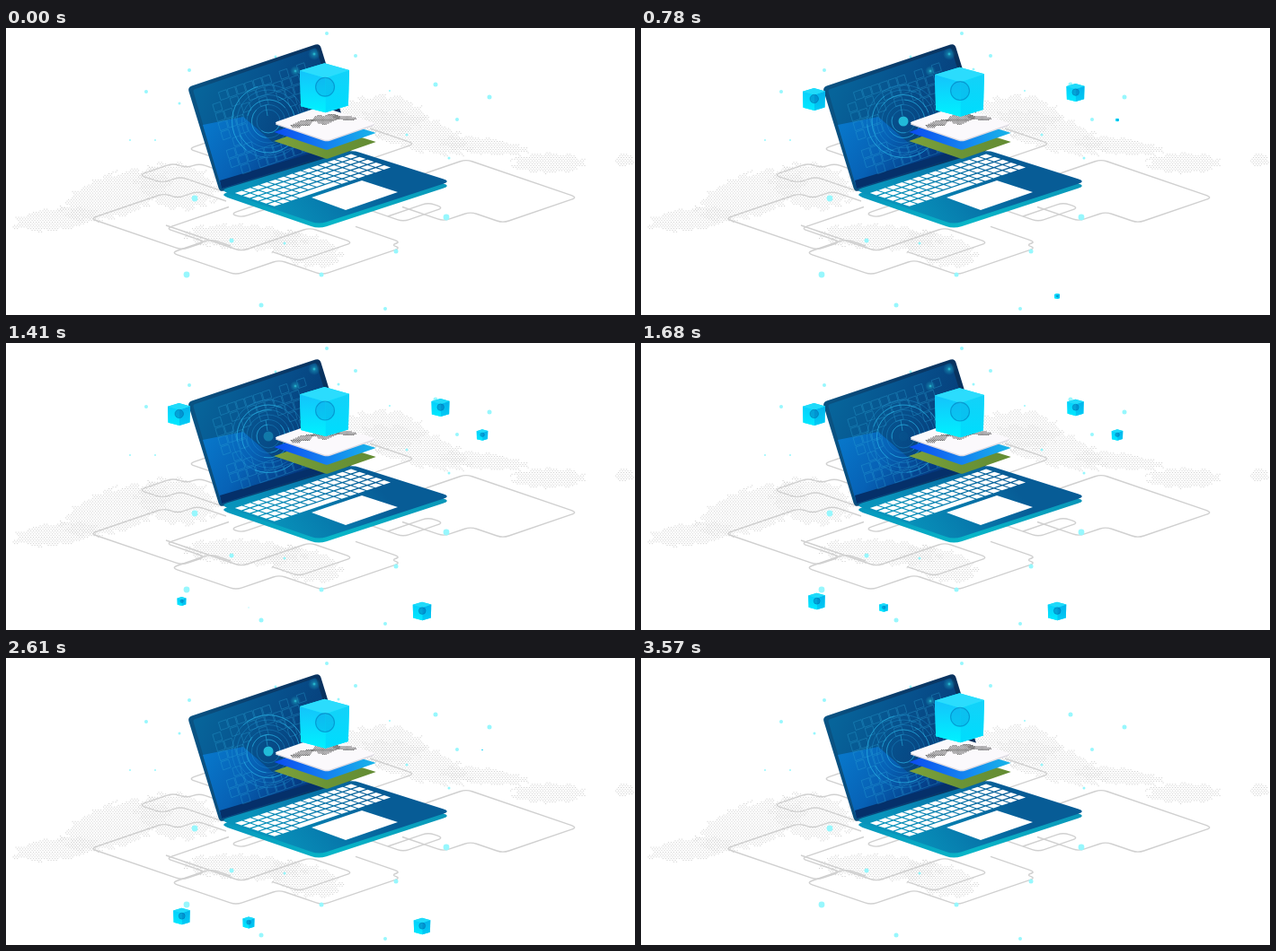
Write an HTML page with a canvas that moves like this. It is 700x320 px and loops after 3600 ms.

```html
<!DOCTYPE html>
<html lang="en">
<head>
<meta charset="utf-8">
<title>Laptop with floating cubes</title>
<style>
html, body { margin: 0; width: 100%; height: 100%; overflow: hidden; background: #fff; }
canvas { display: block; width: 700px; height: 320px; }
</style>
</head>
<body>
<canvas id="stage" width="700" height="320"></canvas>
<script>
const W = 700, H = 320, LOOP = 3600, TAU = 2 * Math.PI;
const SLOPE = .342; // rise of both isometric axes
const stage = document.getElementById('stage').getContext('2d');

function layer(draw) {
  const c = document.createElement('canvas');
  c.width = W;
  c.height = H;
  draw(c.getContext('2d'));
  return c;
}

function ramp(g, x0, y0, x1, y1, ...colors) {
  const f = g.createLinearGradient(x0, y0, x1, y1);
  colors.forEach((c, i) => f.addColorStop(i / (colors.length - 1), c));
  return f;
}

// Point on the way from a to b, at most `cut` away from a
function toward(a, b, cut) {
  const k = Math.min(.5, cut / (Math.hypot(b[0] - a[0], b[1] - a[1]) || 1));
  return [a[0] + (b[0] - a[0]) * k, a[1] + (b[1] - a[1]) * k];
}

function corner(g, prev, p, next, cut) {
  g.lineTo(...toward(p, prev, cut));
  g.quadraticCurveTo(...p, ...toward(p, next, cut));
}

function poly(g, p, fill, cut = 0) {
  const n = p.length;
  g.beginPath();
  p.forEach((a, i) => corner(g, p[(i + n - 1) % n], a, p[(i + 1) % n], cut));
  g.closePath();
  g.fillStyle = fill;
  g.fill();
}

function disc(g, x, y, r, fill) {
  g.beginPath();
  g.arc(x, y, r, 0, TAU);
  g.fillStyle = fill;
  g.fill();
}

// Steps alternate between the rising and the falling axis
function wire(g, x, y, ...steps) {
  const p = [[x, y]];
  steps.forEach((d, i) => {
    x += d;
    y += i % 2 ? d * SLOPE : -d * SLOPE;
    if (d) p.push([x, y]);
  });
  g.beginPath();
  g.moveTo(...p[0]);
  for (let i = 1; i < p.length - 1; i++) corner(g, p[i - 1], p[i], p[i + 1], 7);
  g.lineTo(...p[p.length - 1]);
  g.stroke();
}

// Staggered dots inside tilted blobs with ragged coasts
function land(g, blobs, dx, dy, size, rough) {
  for (const [cx, cy, rx, ry, tilt = 0] of blobs)
    for (let j = Math.floor((cy - 2 * ry) / dy); j * dy < cy + 2 * ry; j++)
      for (let i = Math.floor((cx - 1.5 * rx) / dx); i * dx < cx + 1.5 * rx; i++) {
        const x = (i + (j & 1) / 2) * dx, y = j * dy;
        const u = (x - cx) / rx, v = (y - cy - tilt * (x - cx)) / ry;
        const coast = rough * Math.sin(x * .31 + 2 * Math.sin(y * .43));
        if (u * u + v * v + coast < 1) g.fillRect(x, y, size, size * .8);
      }
}

function drawMap(g) {
  g.fillStyle = '#d2d2d2';
  land(g, [
    [122, 186, 58, 25, -.25], [55, 213, 48, 12, -.1], [190, 176, 45, 25, .1],
    [265, 233, 66, 14, .05], [330, 246, 42, 18, .2],
    [418, 97, 46, 22], [455, 116, 60, 20, .25],
    [530, 131, 48, 9, .1], [603, 150, 40, 11], [688, 147, 10, 7]
  ], 3, 1.8, 1.2, .22);
}

function drawWires(g) {
  g.strokeStyle = '#d0d0d0';
  g.lineWidth = 1.4;
  wire(g, 452, 167, 60, 124, -83, -36, -30, -46);
  wire(g, 425, 210, 45, 17, -45, -40);
  wire(g, 240, 122, -37, 30);
  wire(g, 235, 158, 0, -20, -14, -15, -38, 26, 20, 46);
  wire(g, 245, 193, 0, -32, -22, -15, -82, 102, 26, -44, 70);
  wire(g, 178, 220, 0, 84, 76, 48, -60, -30);
  wire(g, 250, 243, 0, -22, -44, 72, 48, 48, 87, -10, 10, -50);
  wire(g, 300, 190, -50, 12, 40);
  wire(g, 405, 112, 0, 50, -55);
}

function drawSpecks(g) {
  const sizes = [
    [3.4, [[210, 190], [490, 211], [201, 275]]],
    [2.5, [[478, 63], [538, 77], [251, 237], [434, 249], [351, 275], [284, 309]]],
    [2, [[357, 6], [389, 31], [204, 47], [156, 71], [502, 102], [422, 313]]],
    [1.5, [[193, 84], [446, 119], [310, 240], [300, 32], [370, 46], [493, 145]]],
    [1, [[427, 70], [166, 125], [138, 125]]]
  ];
  for (const [r, list] of sizes)
    for (const [x, y] of list) disc(g, x, y, r, '#97f7fd');
}

function drawScreen(g) {
  poly(g, [[202, 66], [349, 17], [386, 137], [238, 183]],
    ramp(g, 204, 80, 370, 60, '#0a5484', '#0a3d6c', '#08305c'), 5);
  const face = [[208, 69], [345, 22], [380, 135], [240, 179]];
  poly(g, face, ramp(g, 215, 70, 350, 130, '#07649a', '#074f8b', '#063874'), 2);
  poly(g, [[219, 108], [264, 99], [300, 130], [367, 124], [380, 135], [240, 179]],
    ramp(g, 220, 105, 310, 165, '#0878cb', '#0762b6', '#053a82'));
  poly(g, [[238, 170], [378, 128], [380, 135], [240, 179]], '#05306a');

  // Faint tiles, aligned to the tilted display
  g.save();
  g.transform(.945, -.327, .287, .958, 211, 71);
  g.strokeStyle = 'rgba(46,165,215,.45)';
  g.lineWidth = .7;
  for (let row = 0; row < 9; row++)
    for (let col = 0; col < 11; col++)
      if ((row * 7 + col * 5) % 11 > 2 && (row < 3 || row > 6 || col < 3 || col > 7))
        g.strokeRect(14 + col * 10.2, 9 + row * 10.7, 9, 9.2);
  g.restore();

  for (const [x, y, r] of [[343, 29, 7], [322, 48, 6]]) {
    const glow = g.createRadialGradient(x, y, 0, x, y, r);
    glow.addColorStop(0, '#35d8e4');
    glow.addColorStop(.3, 'rgba(25,150,185,.6)');
    glow.addColorStop(1, 'rgba(20,140,180,0)');
    disc(g, x, y, r, glow);
  }
}

function drawBase(g) {
  const slab = y => [[238, 181 + y], [385, 136 + y], [495, 171 + y], [348, 219 + y]];
  poly(g, slab(5), ramp(g, 239, 0, 494, 0, '#0797bd', '#08b6c8', '#0a95b8'), 9);
  poly(g, slab(0), ramp(g, 300, 215, 400, 140, '#0893bb', '#0779ac', '#075c96'), 9);

  // Keyboard, in units along its two edges
  const at = (u, v) => [253 + 131 * u + 46 * v, 184 - 44 * u + 15.5 * v];
  const key = (c0, c1, r) => {
    const a = (c0 + .09) / 14, b = (c1 - .09) / 14, t = (r + .1) / 5, d = (r + .88) / 5;
    poly(g, [at(a, t), at(b, t), at(b, d), at(a, d)], '#fff');
  };
  for (let r = 0; r < 5; r++)
    for (let c = 0; c < 14; c++)
      if (r < 4 || c < 3 || c > 7) key(c, c + 1, r);
  key(3, 8, 4);
  poly(g, [[340, 189], [396, 170], [436, 183], [378, 203]], '#fff');
}

const back = layer(g => {
  g.fillStyle = '#fff';
  g.fillRect(0, 0, W, H);
  [drawMap, drawWires, drawSpecks, drawScreen, drawBase].forEach(draw => draw(g));
});

const sheets = layer(g => {
  const sheet = (y, cut, ...colors) => poly(g,
    [[298, y], [350, y - 18], [412, y + 1], [357, y + 20]],
    ramp(g, 300, 0, 411, 0, ...colors), cut);
  sheet(126, 1, '#7da13a', '#6b9436', '#648d34');
  sheet(116, 1, '#0b4df0', '#1480f0', '#18b5e9');
  sheet(107, 4, '#dcd9e1', '#dcd9e1');
  sheet(105.5, 4, '#fbf9fc', '#fbf9fc');
  g.fillStyle = '#555';
  land(g, [[329, 106, 11, 4, -.2], [356, 101, 15, 5, -.1], [377, 100, 12, 2.5, .1]], 1.8, 1.2, 1.2, .4);
});

// A unit cube scaled to size, centred on x, y
function cube(g, x, y, size, big) {
  if (size < .3) return;
  const [top, l0, l1, r0, r1] = big
    ? ['#2bdcfd', '#14c3fb', '#00efff', '#12d2f9', '#00dcfd']
    : ['#20dafa', '#08cffb', '#00e8ff', '#04b4ec', '#00c8f4'];
  const a = [-.5, -.35], b = [.5, -.36], mid = [.02, -.2], foot = [.02, .5];
  const left = [-.48, .37], right = [.48, .36], peak = [0, -.5];
  g.save();
  g.translate(x, y);
  g.scale(size, size);
  poly(g, [a, peak, b, right, foot, left], l1);
  poly(g, [a, mid, foot, left], ramp(g, 0, -.35, 0, .45, l0, l1));
  poly(g, [mid, b, right, foot], ramp(g, 0, -.3, 0, .4, r0, r1));
  poly(g, [a, peak, b, mid], top);
  disc(g, .01, -.02, .19, big ? 'rgba(8,148,218,.32)' : 'rgba(0,110,180,.5)');
  g.strokeStyle = big ? 'rgba(0,105,175,.5)' : 'rgba(0,80,145,.7)';
  g.lineWidth = .02;
  g.stroke();
  g.restore();
}

// x, y, size, growth start, shrink start (ms)
const GROW = 500, SHRINK = 450;
const CUBES = [
  [192.5, 79.5, 25, 100, 1960],
  [483.5, 72, 20, 0, 1600],
  [530, 102.5, 12.5, 600, 2250],
  [463, 299, 20.5, 600, 2520],
  [195.5, 288, 18.5, 1150, 2850],
  [270, 295, 13, 1350, 3130]
];

const wave = k => (1 - Math.cos(TAU * k)) / 2;
const ease = k => wave(Math.min(1, Math.max(0, k)) / 2);

function drawRadar(g, t) {
  g.save();
  g.translate(292, 104);
  for (let i = 0; i < 6; i++) {
    const r = 13 + 5.5 * i;
    const a = i * 1.7 + (i % 2 ? -1 : 1) * t / LOOP * TAU;
    g.lineWidth = 1;
    g.strokeStyle = 'rgba(35,160,220,.35)';
    g.beginPath();
    g.arc(0, 0, r, 0, TAU);
    g.stroke();
    g.strokeStyle = 'rgba(45,190,235,.5)';
    g.beginPath();
    g.arc(0, 0, r, a, a + 2.2);
    g.stroke();
  }
  g.beginPath();
  g.moveTo(-3, -18);
  g.lineTo(-1, -6);
  g.stroke();
  g.globalAlpha = wave(t / 1800);
  disc(g, 0, 0, 5.5, '#22bedb');
  g.restore();
}

function render(t) {
  stage.drawImage(back, 0, 0);
  drawRadar(stage, t);
  stage.drawImage(sheets, 0, 0);
  cube(stage, 354.5, 66.8 + 11 * wave(t / LOOP), 55, true);
  for (const [x, y, size, born, fade] of CUBES)
    cube(stage, x, y, size * (ease((t - born) / GROW) - ease((t - fade) / SHRINK)), false);
}

const start = performance.now();
function tick() {
  render((performance.now() - start) % LOOP);
  requestAnimationFrame(tick);
}
tick();
</script>
</body>
</html>
```
